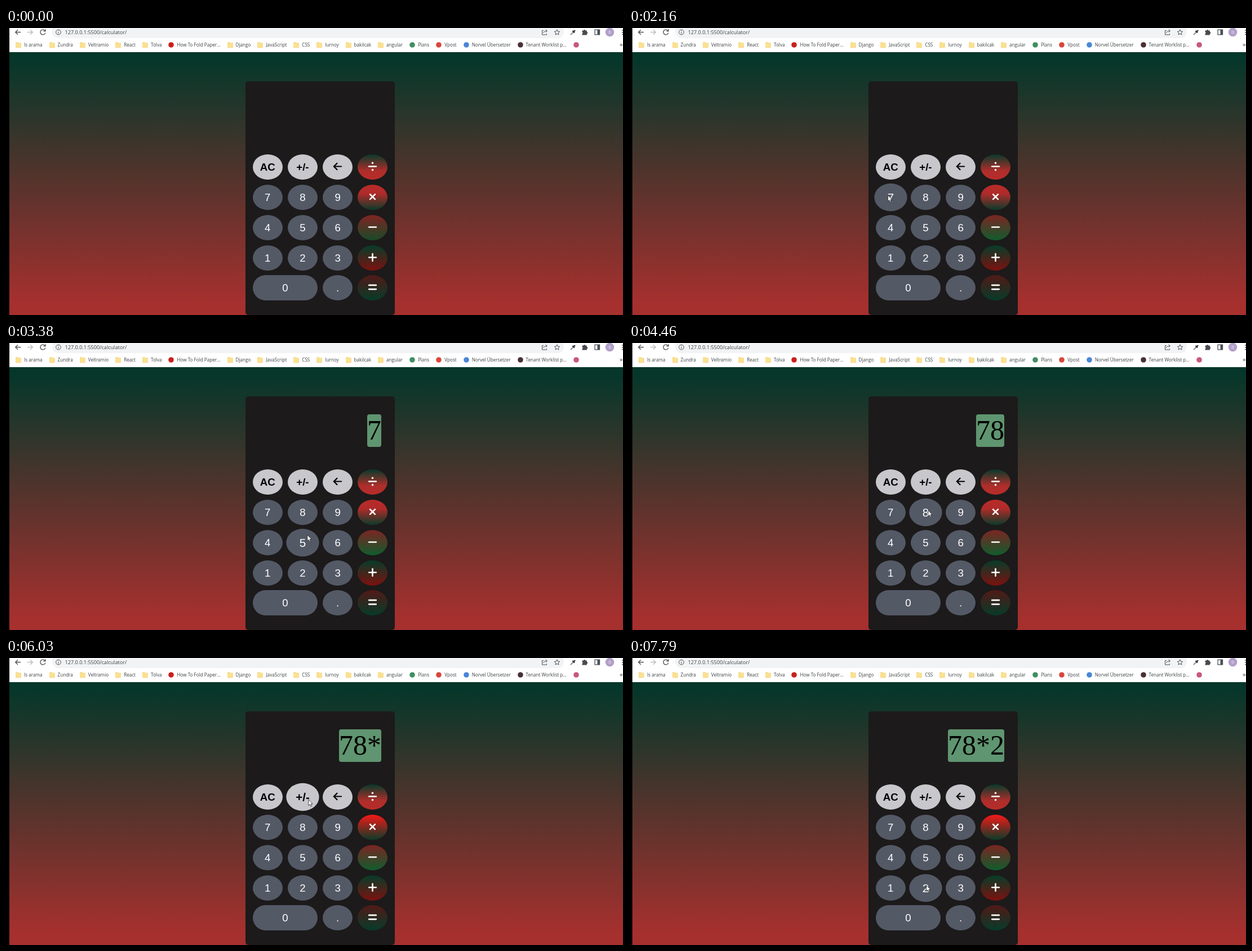
Write an HTML page that moves like this. It is 1095 px wide and 511 px high and loops after 8 s.

```html
<!DOCTYPE html>
<html lang="en">
<head>
<meta charset="utf-8">
<title>Calculator</title>
<style>
  html, body { margin: 0; width: 100%; height: 100%; overflow: hidden; background: #000; }
  #stage { position: absolute; left: 0; top: 0; width: 1095px; height: 511px; overflow: hidden; background: #000; }
  #page { position: absolute; left: 6px; top: 43px; right: 0; bottom: 0;
    background: linear-gradient(#04362a 0%, #06372a 3%, #a5302e 95%, #a5302e 100%); }
  #chrome, #cursor { position: absolute; left: 0; top: 0; overflow: visible; }
  #chrome text, #bookmarks { font-family: "Open Sans", "Noto Sans", sans-serif; fill: #3c4043; color: #3c4043; }
  #bookmarks { position: absolute; left: 17px; top: 23.5px; display: flex; gap: 12px; font-size: 8.15px; line-height: 12px; white-space: nowrap; }
  #bookmarks span { display: flex; gap: 5px; }
  #bookmarks svg { width: 10px; height: 12px; }
  #calc { position: absolute; left: 425px; top: 95px; width: 265px; height: 416px; border-radius: 5px; background: #1c1a1a; }
  #display { position: absolute; right: 429px; top: 127px; height: 57.5px; border-radius: 4px;
    font: 50px/57.5px "Liberation Serif", "Times New Roman", serif; background: #5f9570; color: #000; }
  .key { position: absolute; width: 53px; height: 45px; border-radius: 50%; text-align: center;
    font: 18.7px/45px "Liberation Sans", Arial, sans-serif; color: #fff; background: #545966; }
  .key.light { background: #c8c7cc; color: #000; font-weight: bold; }
  .key.wide { width: 115.3px; border-radius: 22.5px; }
  .key svg { position: absolute; left: 0; top: -1px; fill: none; stroke: currentColor; stroke-width: 2.7; stroke-linecap: round; }
</style>
</head>
<body>
<div id="stage">
  <div id="page"></div>
  <svg id="chrome" width="1095" height="43">
    <rect x="6" width="1089" height="43" fill="#fff"/>
    <rect x="82" y="-5" width="908" height="23" rx="11.5" fill="#f1f3f4"/>
    <g fill="none" stroke="#4b4f54" stroke-width="1.3">
      <path d="M26 7.5H17M21 3.2L16.7 7.5L21 11.8"/>
      <path d="M38 7.5H47M43 3.2L47.3 7.5L43 11.8" stroke="#b9bbbe"/>
      <path d="M69 4.6A4.5 4.5 0 1 0 69.8 8.6M70 2V5.6H66.4"/>
      <g stroke-width="1"><circle cx="93" cy="7.5" r="4.4"/><path d="M93 6.8V10M93 4.6V5.6"/></g>
      <path d="M954 4.5H951.5V12H959.5V10M953.8 9C954.2 6.3 956 5.2 960 5.2M957.6 2.6L960.4 5.2L957.6 7.8" stroke-width="1"/>
      <path d="M978 2.8L979.4 6L982.8 6.3L980.2 8.6L981 12L978 10.2L975 12L975.8 8.6L973.2 6.3L976.6 6Z" stroke-width="1"/>
      <path d="M1002 12L1007 7" stroke="#8b9096" stroke-width="2"/>
      <path d="M1005.5 5L1009 8.5M1007.5 6.5L1010 4" stroke="#303338" stroke-width="2.4"/>
      <path d="M1045 3.2H1053.5V11.8H1045Z"/><path d="M1051.5 3V12" stroke-width="4"/>
    </g>
    <path d="M1022.5 4.5H1025A1.6 1.6 0 0 1 1028.2 4.5H1030.8V7A1.6 1.6 0 0 1 1030.8 10.2V12.6H1022.5V10A1.6 1.6 0 0 0 1022.5 7Z" fill="#46494e"/>
    <circle cx="1071.5" cy="7.5" r="7.8" fill="#b2a0c9"/>
    <text x="1071.5" y="10.4" font-size="8" text-anchor="middle" style="fill:#f4effa">0</text>
    <path d="M1094 4V4.1M1094 7.7V7.8M1094 11.4V11.5" stroke="#4b4f54" stroke-width="2" stroke-linecap="round"/>
    <text x="104.5" y="11" font-size="9.1">127.0.0.1:5500/calculator/</text>
    <text x="1089" y="33" font-size="11">»</text>
  </svg>
  <div id="bookmarks"></div>
  <div id="calc"></div>
  <div id="display"></div>
  <div id="keys"></div>
  <svg id="cursor" width="9" height="14">
    <path d="M.4 .5V11.2L2.8 9L4.5 12.9L6.2 12.1L4.5 8.4H7.8Z" fill="#fff" stroke="#111" stroke-width=".7"/>
  </svg>
</div>
<script>
const LOOP = 8000, STEP = 70;
const $ = id => document.getElementById(id);

// A bookmark is a folder unless it has an icon colour
const bookmarks = [
  ["Is arama"], ["Zundra"], ["Veltramio"], ["React"], ["Tolva"], ["How To Fold Paper...", "#c8201c"],
  ["Django"], ["JavaScript"], ["CSS"], ["lurnoy"], ["bakilcak"], ["angular"], ["Plans", "#3f8f62"],
  ["Vpost", "#d9463a"], ["Norvel Übersetzer", "#4a86d8"], ["Tenant Worklist p...", "#4a3034"], ["", "#c8587a"]
];
$("bookmarks").innerHTML = bookmarks.map(([label, color]) => {
  const icon = color
    ? `<circle cx="5" cy="6" r="4.8" fill="${color}"/>`
    : '<path d="M.4 1.5h4l1 1.2h4.2v8.3h-9.2z" fill="#fbe090" stroke="#efd27a" stroke-width=".6"/>';
  return `<span><svg>${icon}</svg>${label}</span>`;
}).join("");

// Icons are drawn around the centre of a key
const icons = {
  "÷": '<path d="M-6.3 0H6.3"/><path d="M0 -6.2V-6.1M0 6.2V6.1" stroke-width="3.6"/>',
  "×": '<path d="M-4.4 -4.4L4.4 4.4M4.4 -4.4L-4.4 4.4"/>',
  "−": '<path d="M-6.3 0H6.3"/>',
  "+": '<path d="M-6.3 0H6.3M0 -6.3V6.3"/>',
  "=": '<path d="M-6.3 -3.6H6.3M-6.3 3.6H6.3"/>',
  "←": '<path d="M6.6 0H-6.4M-1 -5.6L-6.6 0L-1 5.6" stroke-width="2.2"/>'
};
const fills = {
  "÷": "#073a2a, #ae2e2b 65%, #b82c2a",
  "×": "#b82b2a, #b02b2a 35%, #0b3b29",
  "−": "#802423, #194a29",
  "+": "#063c29, #7c110f",
  "=": "#521917, #063b29"
};
// Colours that stay once the cursor has visited a key
const visitedFills = { "−": "#7c2523, #105c2d", "×": "#f61918, #0a3b28" };

const keys = {};
const rows = ["AC +/- ← ÷", "7 8 9 ×", "4 5 6 −", "1 2 3 +", "0 _ . ="];
rows.forEach((row, r) => row.split(" ").forEach((label, c) => {
  if (label === "_") return;
  const x = 437.7 + 62.25 * c, y = 225 + 53.85 * r;
  const el = document.createElement("div");
  el.className = "key" + (r === 0 && c < 3 ? " light" : "") + (label === "0" ? " wide" : "");
  el.style.left = x + "px";
  el.style.top = y + "px";
  if (icons[label]) el.innerHTML = `<svg width="53" height="45" viewBox="-26.5 -22.5 53 45">${icons[label]}</svg>`;
  else el.textContent = label;
  $("keys").append(el);
  keys[label] = { el, x: x + 26.5, y: y + 22.5 };
}));

// Each leg glides to a spot relative to a key; a leg may begin with a click that types a character
const route = [
  { from: 0, to: 0, key: "=", dx: 300, dy: 24 },
  { from: 650, to: 850, key: "=", dx: 179, dy: -3 },
  { from: 1180, to: 1320, key: "−", dx: 1, dy: -11 },
  { from: 1590, to: 2160, key: "7", dx: -5, dy: -4 },
  { from: 2420, to: 3380, key: "5", dx: 8, dy: -14, types: "7" },
  { from: 3520, to: 4060, key: "8", dx: 4, dy: -4 },
  { from: 4460, to: 5060, key: "×", dx: 15, dy: -10, types: "8" },
  { from: 5060, to: 5600, key: "×", dx: -6, dy: -13 },
  { from: 5750, to: 6030, key: "+/-", dx: 10, dy: 4, types: "*" },
  { from: 6030, to: 6370, key: "5", dx: 10, dy: -10 },
  { from: 6570, to: 6710, key: "2", dx: 27, dy: -19 },
  { from: 6710, to: 6920, key: "3", dx: -14, dy: -7 },
  { from: 6920, to: 7260, key: "2", dx: -7, dy: -8 },
  { from: 7660, to: 7790, key: "2", dx: 1, dy: -5, types: "2" }
];

const ease = p => p * p * (3 - 2 * p);
const spot = leg => ({ x: keys[leg.key].x + leg.dx, y: keys[leg.key].y + leg.dy });

function cursorAt(t) {
  const i = route.findLastIndex(leg => leg.from <= t);
  const leg = route[i], b = spot(leg);
  if (i === 0 || t >= leg.to) return b;
  const a = spot(route[i - 1]);
  const f = ease(Math.floor((t - leg.from) / STEP) * STEP / (leg.to - leg.from));
  return { x: a.x + (b.x - a.x) * f, y: a.y + (b.y - a.y) * f };
}

function draw(t) {
  const p = cursorAt(t);
  $("cursor").style.display = t < route[1].from ? "none" : "";
  $("cursor").style.transform = `translate(${p.x}px, ${p.y}px)`;
  for (const [label, { el, x, y }] of Object.entries(keys)) {
    const hovered = Math.hypot((p.x - x) / 26.5, (p.y - y) / 22.5) < 1;
    el.style.transform = hovered ? "scale(1.1)" : "none";
    const visited = route.some(leg => leg.key === label && leg.to <= t);
    const fill = visited && visitedFills[label] || fills[label];
    if (fill) el.style.background = `linear-gradient(${fill})`;
  }
  $("display").textContent = route.map(leg => leg.from <= t && leg.types || "").join("");
}

function tick() {
  draw(performance.now() % LOOP);
  requestAnimationFrame(tick);
}
tick();
</script>
</body>
</html>
```
